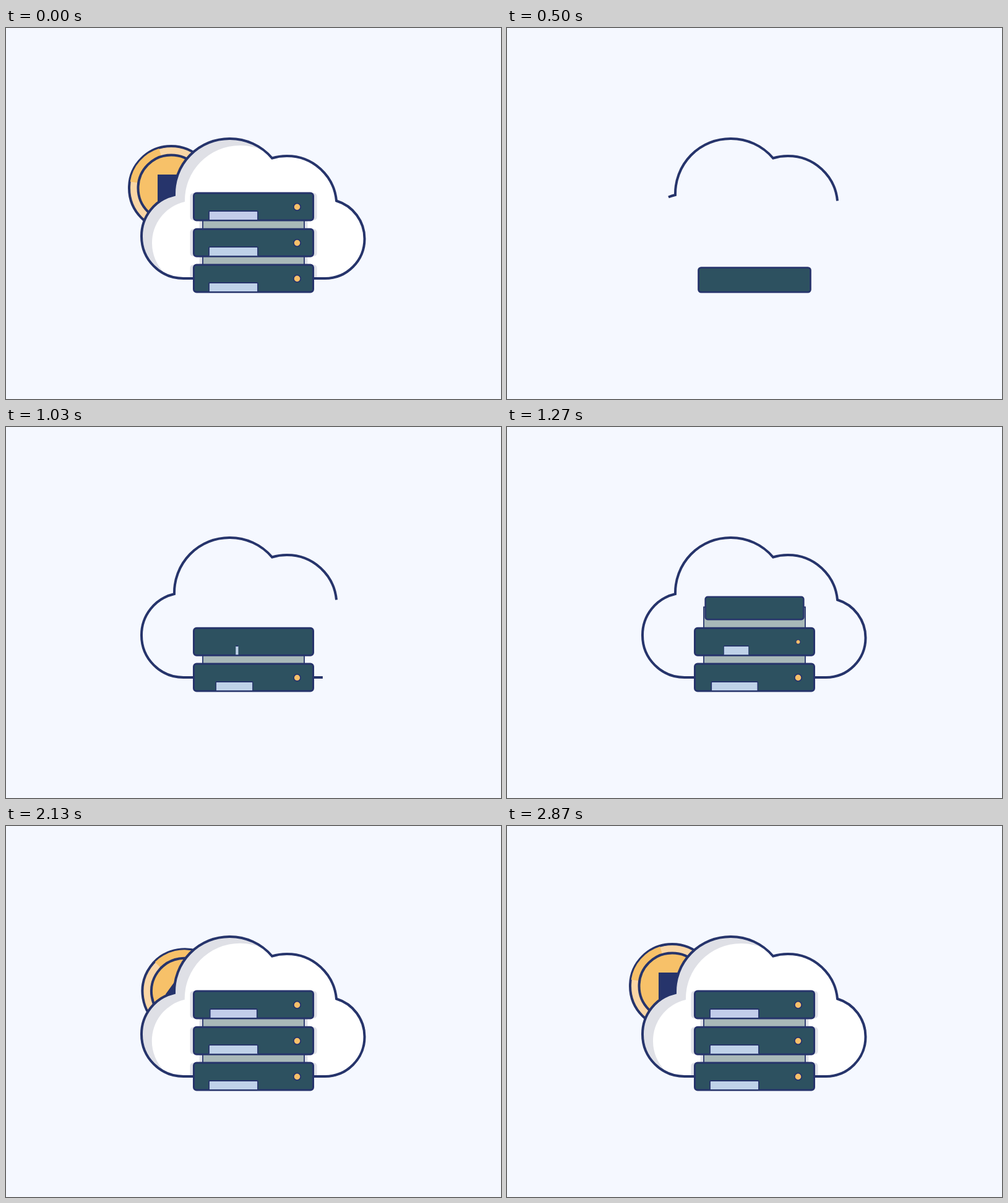
Write an HTML page that moves like this. It is 800 px wide and 600 px high and loops after 3610 ms.

```html
<!DOCTYPE html>
<html lang="en">
<head>
<meta charset="utf-8">
<title>Cloud servers</title>
<style>
  html, body { margin: 0; width: 100%; height: 100%; overflow: hidden; background: #f5f8ff; }
  svg { display: block; width: 100%; height: 100%; }
</style>
</head>
<body>
<svg viewBox="0 0 800 600">
  <defs>
    <path id="cloud" pathLength="1" d="M534 279.5 A80 80 0 0 0 454 207 A80 80 0 0 0 430 210.5
      A89 89 0 0 0 361 179 A89 89 0 0 0 272 270 A68 68 0 0 0 219 337 A68 68 0 0 0 287 405
      H515.5 A64 64 0 0 0 579.5 341 A64 64 0 0 0 534 279.5Z"/>
    <clipPath id="inside"><use href="#cloud"/></clipPath>
  </defs>

  <g id="coin" stroke="#26346b" stroke-width="4">
    <circle r="68" fill="#fad6a5"/>
    <path d="M-60.4 -9.6 A61 61 0 0 1 -18 -58.3" fill="none" stroke="#f7c169" stroke-width="12"/>
    <circle r="53.5" fill="#f7c169"/>
    <rect x="-22" y="-22" width="44" height="44" fill="#26346b" stroke="none"/>
  </g>

  <g id="fill" clip-path="url(#inside)">
    <use href="#cloud" fill="#dfe0e6"/>
    <g fill="#fff">
      <use id="light" href="#cloud"/>
      <circle cx="454" cy="287" r="80"/>
      <circle cx="515.5" cy="341" r="64"/>
      <path d="M400 290H530V406H400Z"/>
    </g>
    <g id="shade" fill="#e1e2e9"></g>
  </g>

  <use id="outline" href="#cloud" fill="none" stroke="#26346b" stroke-width="4"/>
  <g id="links" fill="#a9b9b9" stroke="#26346b" stroke-width="1.8"></g>
  <g id="servers" stroke="#26346b"></g>
</svg>
<script>
const LOOP = 3610, STAGGER = 417;
const $ = id => document.getElementById(id);

function add(parent, tag, attrs) {
  const el = document.createElementNS('http://www.w3.org/2000/svg', tag);
  for (const key in attrs) el.setAttribute(key, attrs[key]);
  return parent.appendChild(el);
}

const progress = (t, start, length) => Math.min(1, Math.max(0, (t - start) / length));
const easeOut = (p, power = 2) => 1 - (1 - p) ** power;
const set = (el, name, value) => el.setAttribute(name, value);

function place(el, x, y, sx, sy = 1) {
  set(el, 'visibility', sx > 0 && sy > 0 ? 'visible' : 'hidden');
  set(el, 'transform', `translate(${x} ${y}) scale(${sx} ${sy})`);
}

// Servers from bottom to top; the lower two carry a link to the next one.
const servers = [383, 325.2, 267].map((top, i) => {
  const linked = i < 2;
  if (linked) add($('shade'), 'rect', { x: 312.5, y: top - 15, width: 175, height: 16 });
  add($('shade'), 'rect', { x: 297.5, y: top, width: 205, height: 44, rx: 5 });
  return {
    top,
    link: linked && add($('links'), 'rect', { x: 318, width: 164 }),
    box: add($('servers'), 'rect', {
      x: -96.5, y: -45.5, width: 193, height: 44, rx: 4.5, fill: '#2d5160', 'stroke-width': 3
    }),
    panel: add($('servers'), 'path', {
      d: 'M-45.7 0V-12.5Q-45.7 -14 -44.2 -14H31.8Q33.3 -14 33.3 -12.5V0',
      fill: i === 2 ? '#c3cdea' : '#bfd2e9', 'stroke-width': 1.8
    }),
    dot: add($('servers'), 'circle', { r: 5.7, fill: '#f8c06a', 'stroke-width': 1.8 })
  };
});

function drawServer({ top, link, box, panel, dot }, t) {
  const grow = progress(t, 220, 375);
  place(box, 400, top + 45.5, easeOut(grow), 0.6 + 0.4 * grow);
  place(panel, 373.7, top + 43, easeOut(progress(t, 590, 875)));
  const size = easeOut(progress(t, 686, 430));
  place(dot, 470.5, top + 22.4, size, size);
  if (link) {
    const rise = 56 * progress(t, 708, 145);
    set(link, 'visibility', rise ? 'visible' : 'hidden');
    set(link, 'y', top + 22 - rise);
    set(link, 'height', rise);
  }
}

function draw(t) {
  const trace = progress(t, 20, 1250);
  set($('outline'), 'stroke-dasharray', trace < 1 ? `${trace} 2` : 'none');
  servers.forEach((server, i) => drawServer(server, t - i * STAGGER));

  set($('fill'), 'opacity', progress(t, 1280, 180));
  set($('shade'), 'opacity', progress(t, 1400, 200));
  const shift = easeOut(progress(t, 1460, 760));
  set($('light'), 'transform', `translate(${17 * shift} ${11 * shift})`);

  const slide = progress(t, 1813, 837);
  const left = 1 - easeOut(slide, 3);
  set($('coin'), 'visibility', slide ? 'visible' : 'hidden');
  set($('coin'), 'transform', `translate(${267 + 90 * left} ${259 + 35 * left}) rotate(${150 * left})`);
}

function tick(now) {
  const t = now % LOOP;
  draw(t < 30 ? LOOP : t); // the finished picture is held briefly across the restart
  requestAnimationFrame(tick);
}

draw(LOOP);
requestAnimationFrame(tick);
</script>
</body>
</html>
```
